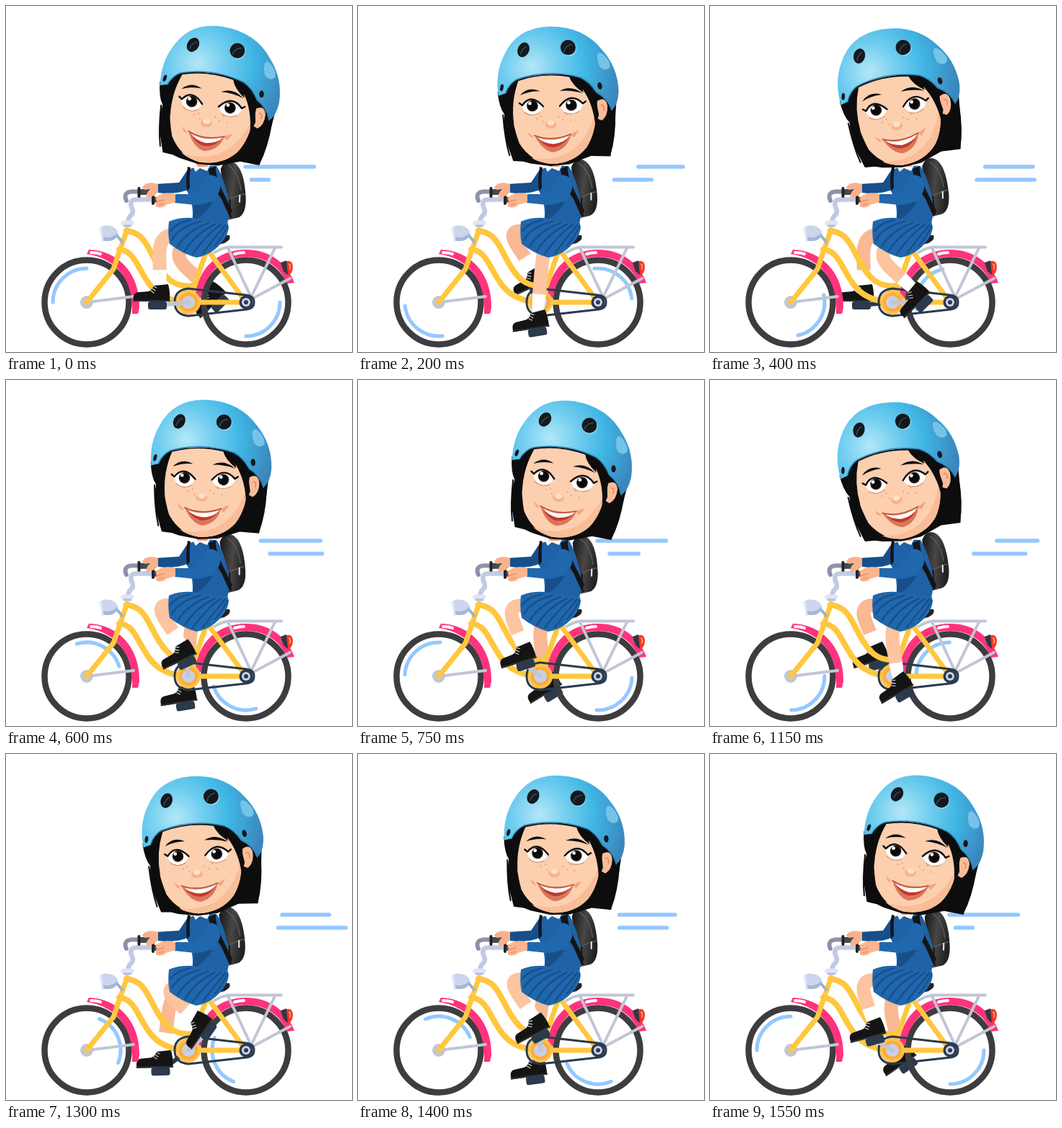
These frames come from a looping animation (480x480 px, 1600 ms). An HTML page:

```html
<!DOCTYPE html>
<html lang="en">
<head>
<meta charset="utf-8">
<title>Bike ride</title>
<style>
html,body{margin:0;width:100%;height:100%;overflow:hidden;background:#fff}
svg{display:block;width:100vw;height:100vh}
.ln{fill:none;stroke-linecap:round;stroke-linejoin:round}
</style>
</head>
<body>
<svg viewBox="0 0 480 480">
<defs>
  <radialGradient id="dome" gradientUnits="userSpaceOnUse" cx="242" cy="84" r="122">
    <stop offset="0" stop-color="#b4e7f8"/><stop offset=".3" stop-color="#74cff0"/>
    <stop offset=".62" stop-color="#40b6e4"/><stop offset="1" stop-color="#3a86bd"/>
  </radialGradient>
  <linearGradient id="packFill" x1="0" x2="1" y1="0" y2=".25">
    <stop offset="0" stop-color="#151515"/><stop offset=".55" stop-color="#484646"/><stop offset="1" stop-color="#222"/>
  </linearGradient>
  <g id="shoe">
    <rect x="-13" y="-5" width="26" height="11" rx="3" fill="#2b3a4c"/>
    <path d="M-33-6Q-35-18-25-18L-13-19Q-8-20-5-27L15-29Q18-18 17-5L-33-5Z" fill="#141414"/>
    <path d="M-33-6H17" class="ln" stroke="#303030" stroke-width="2"/>
    <path d="M-9-20l4 3M-7-23l4 3M-5-26l4 2" class="ln" stroke="#ddd" stroke-width="1.1"/>
  </g>
</defs>

<g class="ln" stroke="#94c8ff" stroke-width="5.5">
  <path id="dashA"/><path id="dashB"/>
</g>
<g id="far"></g>

<!-- wheels -->
<g class="ln">
  <g stroke="#3d3d3f" stroke-width="8.5"><circle cx="112" cy="411" r="58.5"/><circle cx="333" cy="411" r="58.5"/></g>
  <g stroke="#94c8ff" stroke-width="5">
    <path id="arcF" d="M65 411A47 47 0 0 1 112 364"/>
    <path id="arcR" d="M380 411A47 47 0 0 1 333 458"/>
  </g>
</g>

<!-- fenders, rack, lamps -->
<path d="M112 344L115 338C155 339 186 371 185 418L183 427 175 427C178 382 154 350 112 344Z" fill="#ff337d"/>
<path d="M118 342Q125 342 131 344" class="ln" stroke="#fff" stroke-width="4"/>
<path d="M262 405C266 364 293 338 333 338C365 338 390 356 400 384L390 385C380 362 361 348 333 348C299 348 276 371 271 405Z" fill="#ff337d"/>
<path d="M317 344Q324 342 330 342" class="ln" stroke="#fff" stroke-width="4"/>
<g class="ln" stroke="#c1c6d5" stroke-width="4">
  <path d="M112 411L177 403M289 342Q301 335 309 334.500H382M308 336L340 404M373 336L340 404M334 410L394 378"/>
</g>
<path d="M389 354Q398 352 398 363Q397 372 391 374L387 363Z" fill="#f2352f"/>
<path d="M381 356L389 353 391 373 385 368Z" fill="#33373f"/>
<path d="M393 358Q395 360 394 365" class="ln" stroke="#ffa05c" stroke-width="2"/>

<!-- frame -->
<circle cx="112" cy="411" r="9" fill="#c1c6d5"/>
<g class="ln" stroke="#ffc73e">
  <path d="M277 335L333 411H253L281 332" stroke-width="7"/>
  <path d="M157 338C182 339 184 374 207 395Q221 408 248 411" stroke-width="8"/>
  <path d="M167 312C190 314 195 331 207 353C220 377 232 391 260 388" stroke-width="8"/>
  <path d="M168 310L149 365 112 411" stroke-width="7"/>
</g>
<path d="M285 331Q284 323 295 320Q303 317 310 318Q313 324 303 329Q294 332 285 331Z" fill="#222326"/>

<!-- drive train -->
<circle cx="253" cy="411" r="17" fill="#ffc24a"/>
<circle cx="253" cy="411" r="13" fill="#ffab38"/>
<circle cx="253" cy="411" r="9" fill="#c8d0e4"/>
<path d="M253 392Q234 394 234 411T253 430L333 421Q344 420 344 411T333 401Z" class="ln" stroke="#2b3a4c" stroke-width="3"/>
<circle cx="333" cy="411" r="9.500" fill="#2b3a4c"/>
<circle cx="333" cy="411" r="6" fill="#c8d4e8"/>
<circle cx="333" cy="411" r="3" fill="#2b3a4c"/>

<!-- handlebar and headlight -->
<path d="M151 315L161 327" class="ln" stroke="#9fb0d3" stroke-width="4"/>
<path d="M131 308Q134 303 144 305Q155 307 155 317Q153 324 143 325L134 326Z" fill="#ccd5ec"/>
<path d="M133 320Q146 324 155 314Q155 324 144 326L134 326Z" fill="#a6b5d8"/>
<path d="M131 308L134 326" class="ln" stroke="#e4eaf6" stroke-width="3"/>
<g class="ln">
  <path d="M167 270Q162 259 174 257.500H188" stroke="#8b93a8" stroke-width="6"/>
  <path d="M169 301Q170 292 174 290Q178 285 174 279Q171 269 180 268.500H204" stroke="#c0cae4" stroke-width="6.500"/>
  <path d="M163 301H174" stroke="#dfe5f4" stroke-width="7"/>
  <path d="M164 305H173" stroke="#b3bfdd" stroke-width="3"/>
  <path d="M187 258H203M206 269H220" stroke="#4a4a4e" stroke-width="8"/>
  <path d="M184.500 253V264M204 264V274" stroke="#252527" stroke-width="4"/>
</g>

<g id="near"></g>

<!-- body -->
<path d="M252 227L240 245 208 247 211 259Q235 262 252 255Z" fill="#174f8c"/>
<path d="M211 247Q199 243 192 248Q186 252 193 255L200 254Q193 261 195 266Q202 267 211 258Z" fill="#f9b18b"/>
<g id="pack">
  <path d="M296 224Q301 210 313 214Q329 221 332 264Q333 286 322 291L306 295Q301 263 296 224Z" fill="url(#packFill)"/>
  <path d="M307 219Q321 228 325 253M311 265Q322 260 330 258" class="ln" stroke="#5b5959" stroke-width="1.500"/>
  <path d="M310 267Q310 284 312 291" class="ln" stroke="#111" stroke-width="2"/>
  <path d="M323.500 260V269" class="ln" stroke="#ececec" stroke-width="2"/>
</g>
<path d="M252 228Q265 220 292 222Q302 236 309 270Q311 286 307 302H258Q262 275 250 255Z" fill="#1f62a5"/>
<path d="M261 272H287Q277 288 258 300Q261 286 261 272Z" fill="#174f8c"/>
<path d="M252 223Q249 240 251 257L255 252Q254 236 256 224Z" fill="#151515"/>
<path d="M281 226Q282 243 299 268L310 292 314 284 301 258Q290 236 291 222Z" fill="#151515"/>
<path d="M258 220L263 230 269 225 279 229 284 219Z" fill="#f4f7fb"/>
<path d="M260 213H286L279 223H266Z" fill="#ef9f78"/>
<path d="M226 299Q239 293 260 294Q285 302 307 300Q312 309 303 323Q288 345 264 349Q245 344 227 330Q224 315 226 299Z" fill="#2067ad"/>
<path d="M256 297Q236 301 228 312M270 299Q240 306 230 325M281 301Q252 311 238 334M290 303Q264 315 248 340M298 303Q277 318 259 344M304 304Q289 322 273 343M307 306Q300 321 290 332" class="ln" stroke="#17508e" stroke-width="2.500"/>
<path d="M276 240Q283 230 293 238Q302 250 292 264Q283 275 263 276L234 273 232 261 262 261Q270 254 276 240Z" fill="#2067ad"/>
<path d="M235 261Q222 257 213 262Q205 266 209 270Q206 275 209 279Q218 281 222 276L235 272Z" fill="#fbb58f"/>
<path d="M210 271L219 269M212 276L219 274" class="ln" stroke="#e98d65" stroke-width="1.300"/>

<!-- head -->
<g id="head">
  <path d="M194 118Q196 140 203 149Q200 168 206 190L214 214 228 215 238 218 265 222 292 220 322 209 349 210 355 175 359 130 335 96 220 96Z" fill="#0d0d0e"/>
  <path d="M201 150Q203 184 209 206M356 150Q356 184 348 208" class="ln" stroke="#0d0d0e" stroke-width="2"/>
  <path d="M332 133Q343 126 346 139Q347 154 338 160L331 157Z" fill="#f8bd98"/>
  <path d="M337 139Q342 137 341 146" class="ln" stroke="#dd8964" stroke-width="1.500"/>
  <path d="M220 102Q265 88 313 101Q329 124 329 147Q330 176 316 197Q298 219 266 219Q239 216 223 190Q212 158 214 137Q214 115 220 102Z" fill="#fccfaf"/>
  <path d="M330 146Q330 176 316 197Q298 219 266 219Q249 217 239 210Q266 216 290 204Q318 188 330 146Z" fill="#f9bd98"/>
  <path d="M217 103Q265 87 316 101L328 120 334 152 329 169Q327 138 312 116L313 121Q298 111 294 99Q257 92 223 103Q212 132 216 163Q208 150 204 125Z" fill="#0d0d0e"/>
  <path d="M296 101Q303 110 315 115" class="ln" stroke="#0d0d0e" stroke-width="2"/>
  <g fill="#0d0d0e">
    <path d="M225 123Q237 110 253 118Q239 117 225 123Z"/>
    <path d="M280 118Q296 109 312 122Q298 117 280 118Z"/>
  </g>
  <path d="M227 138Q240 119 257 139Q251 152 239 150Q231 148 227 138Z" fill="#fff"/>
  <path d="M280 139Q296 118 313 137Q308 149 295 150Q284 148 280 139Z" fill="#fff"/>
  <g fill="#2b1710"><circle cx="242" cy="138" r="7.800"/><circle cx="296" cy="138" r="7.800"/></g>
  <g fill="#090909"><circle cx="242" cy="138" r="6"/><circle cx="296" cy="138" r="6"/></g>
  <g fill="#fff"><circle cx="238.500" cy="134.500" r="2.400"/><circle cx="292.500" cy="134.500" r="2.400"/></g>
  <path d="M224 134L228 137Q240 120 257 139M280 139Q296 119 312 136L316 133" class="ln" stroke="#0d0d0e" stroke-width="2.400"/>
  <path d="M231 147Q241 154 252 148M286 148Q296 153 307 147" class="ln" stroke="#c98a68" stroke-width="1"/>
  <path d="M259 163Q267 155 275 163Q276 169 267 170Q259 170 259 163Z" fill="#f8b28e"/>
  <ellipse cx="267" cy="162" rx="5" ry="3.500" fill="#ffe1c9"/>
  <path d="M234 174Q239 177 244 183L238 181ZM294 180Q299 175 306 173L299 183Z" fill="#f5a37d"/>
  <g id="freckles" fill="#e89a72"></g>
  <path d="M244 179Q256 184 268 184Q281 184 295 178Q290 199 270 203Q255 201 244 179Z" fill="#dc7559"/>
  <path d="M248 182Q269 191 292 181Q284 195 269 196Q257 195 248 182Z" fill="#c2392b"/>
  <path d="M248 182Q269 190 293 180Q286 190 270 191.500Q256 190 248 182Z" fill="#fff"/>
  <path d="M244 179Q268 189 295 178" class="ln" stroke="#b9573f" stroke-width="1.500"/>
  <path d="M195 123Q191 91 204 67Q222 29 267 28.500Q314 28.500 340 62Q361 86 362 119Q361 139 352 146Q347 130 331 121Q321 106 309 100Q265 87 221 101Q209 108 205 120Z" fill="url(#dome)"/>
  <path d="M205 120Q210 107 221 101Q265 87 309 100Q322 106 331 121Q347 130 352 146" class="ln" stroke="#2a7fae" stroke-width="1.500"/>
  <g fill="#8fdcf6">
    <ellipse cx="232" cy="61" rx="8.500" ry="11" transform="rotate(24 232 61)"/>
    <ellipse cx="294" cy="59" rx="10.500" ry="11"/>
  </g>
  <g fill="#17181b">
    <ellipse cx="231" cy="60" rx="8" ry="10.500" transform="rotate(24 231 60)"/>
    <ellipse cx="293" cy="58" rx="10.500" ry="10.500"/>
    <ellipse cx="200" cy="112" rx="2.300" ry="4.800" transform="rotate(12 200 112)"/>
    <ellipse cx="336" cy="112" rx="3.200" ry="5" transform="rotate(-8 336 112)"/>
  </g>
  <path d="M227 66Q229 58 235 56M287 64Q289 55 298 54" class="ln" stroke="#24506a" stroke-width="1.500"/>
  <path d="M333 71Q334 63 341 68Q353 79 350 87Q343 93 336 85Q333 78 333 71Z" fill="#76c3ea"/>
</g>
</svg>
<script>
const $ = id => document.getElementById(id);
const set = (el, o) => { for (const k in o) el.setAttribute(k, o[k]); };
const LOOP = 1600, STEP = 50, HIP = [264, 316], AXLE = [253, 411];

// phase, pedal x, pedal y, foot turn, knee x, knee y
const POSES = [
  [0, 210, 415, 0, 212, 318], [30, 208, 435, 0, 222, 326],
  [90, 249, 452, -9, 256, 346], [150, 275, 432, -35, 248, 351],
  [180, 297, 413, -45, 232, 347], [222, 281, 385, -55, 219, 327],
  [270, 251, 392, -25, 206, 310], [330, 229, 397, -15, 207, 312]
];
const CRANK = [[0, 0], [12, 270], [19, 390], [26, 582], [31, 690], [32, 720]];
const BOB = [[0, -2], [4, 0], [8, 1], [12, -1], [19, -1], [26, 2], [31, 0], [32, -2]];
const TOP = [[0, 0], [5, 71], [15, 0], [16.6, 0], [22, 71], [26, 51], [31, 0], [32, 0]];
const LOW = [[0, 0], [10, 1], [16.5, 0], [26, 1], [31, 0], [32, 0]];

function track(keys, t) {
  let i = 0;
  while (i < keys.length - 2 && t >= keys[i + 1][0]) i++;
  const [a, b] = [keys[i], keys[i + 1]];
  return a[1] + (b[1] - a[1]) * (t - a[0]) / (b[0] - a[0]);
}

// smooth cyclic blend of the leg poses
function poseAt(phase) {
  const n = POSES.length, p = (phase % 360 + 360) % 360;
  const key = i => {
    const k = POSES[(i + n) % n];
    return [k[0] + 360 * Math.floor(i / n), ...k.slice(1)];
  };
  let i = n - 1;
  while (POSES[i][0] > p) i--;
  const [a, b, c, d] = [key(i - 1), key(i), key(i + 1), key(i + 2)];
  const h = c[0] - b[0], u = (p - b[0]) / h, u2 = u * u, u3 = u2 * u;
  return b.slice(1).map((v, j) => {
    j++;
    const m0 = (c[j] - a[j]) / (c[0] - a[0]) * h, m1 = (d[j] - b[j]) / (d[0] - b[0]) * h;
    return (2 * u3 - 3 * u2 + 1) * v + (u3 - 2 * u2 + u) * m0 + (3 * u2 - 2 * u3) * c[j] + (u3 - u2) * m1;
  });
}

function makeLeg(id, skin, metal) {
  const g = $(id);
  g.innerHTML = `<path class="ln" stroke="${metal}" stroke-width="6"/>
    <path class="ln" stroke="${skin}" stroke-width="19" style="stroke-linecap:butt"/>
    <path fill="#fff"/><use href="#shoe"/>`;
  const [arm, leg, sock, shoe] = g.children;
  return phase => {
    const [px, py, turn, kx, ky] = poseAt(phase);
    const r = turn * Math.PI / 180, c = Math.cos(r), s = Math.sin(r);
    const ax = px + 4 * c + 24 * s, ay = py + 4 * s - 24 * c;
    const dx = ax - kx, dy = ay - ky, len = Math.hypot(dx, dy);
    const at = (u, w) => `${kx + dx * u - dy / len * w} ${ky + dy * u + dx / len * w}`;
    const bend = HIP.map((v, i) => v + ([kx, ky][i] - v) * .6);
    set(arm, {d: `M${AXLE}L${px} ${py}`});
    set(leg, {d: `M${HIP}L${bend}Q${kx} ${ky} ${at(.4, 0)}L${at(.68, 0)}`});
    set(sock, {d: `M${at(.66, 9.5)}L${at(1, 8)}L${at(1, -8)}L${at(.66, -9.5)}Z`});
    set(shoe, {transform: `translate(${px} ${py}) rotate(${turn})`});
  };
}

const near = makeLeg('near', '#fcc5a0', '#c1c6d5');
const far = makeLeg('far', '#f8b994', '#2b3a4c');

[[248, 156], [254, 153], [257, 160], [278, 154], [284, 158], [289, 151], [295, 159]].forEach(([x, y]) => {
  const dot = document.createElementNS('http://www.w3.org/2000/svg', 'circle');
  set(dot, {cx: x, cy: y, r: 1});
  $('freckles').append(dot);
});

function draw(ms) {
  const n = Math.floor(ms % LOOP / STEP), u = n / 31;
  const spin = 720 * u + 9 * Math.sin(Math.PI * u);
  const sway = Math.cos(spin * Math.PI / 180);
  const crank = track(CRANK, n), top = track(TOP, n), low = track(LOW, n);
  near(crank);
  far(crank + 180);
  set($('arcF'), {transform: `rotate(${-spin} 112 411)`});
  set($('arcR'), {transform: `rotate(${-spin} 333 411)`});
  set($('head'), {transform: `translate(1.5 ${track(BOB, n)}) rotate(${9.4 * sway} 270 222)`});
  set($('pack'), {transform: `translate(0 ${2.3 * sway}) rotate(${1.5 * sway} 310 290)`});
  set($('dashA'), {d: `M${332 + top} 223H${427.5 + .41 * top}`});
  set($('dashB'), {d: `M${340.5 + 37 * low} 241H${364.5 + 107 * low}`});
}

const start = performance.now();
function tick() {
  draw(performance.now() - start);
  requestAnimationFrame(tick);
}
draw(0);
tick();
</script>
</body>
</html>
```
